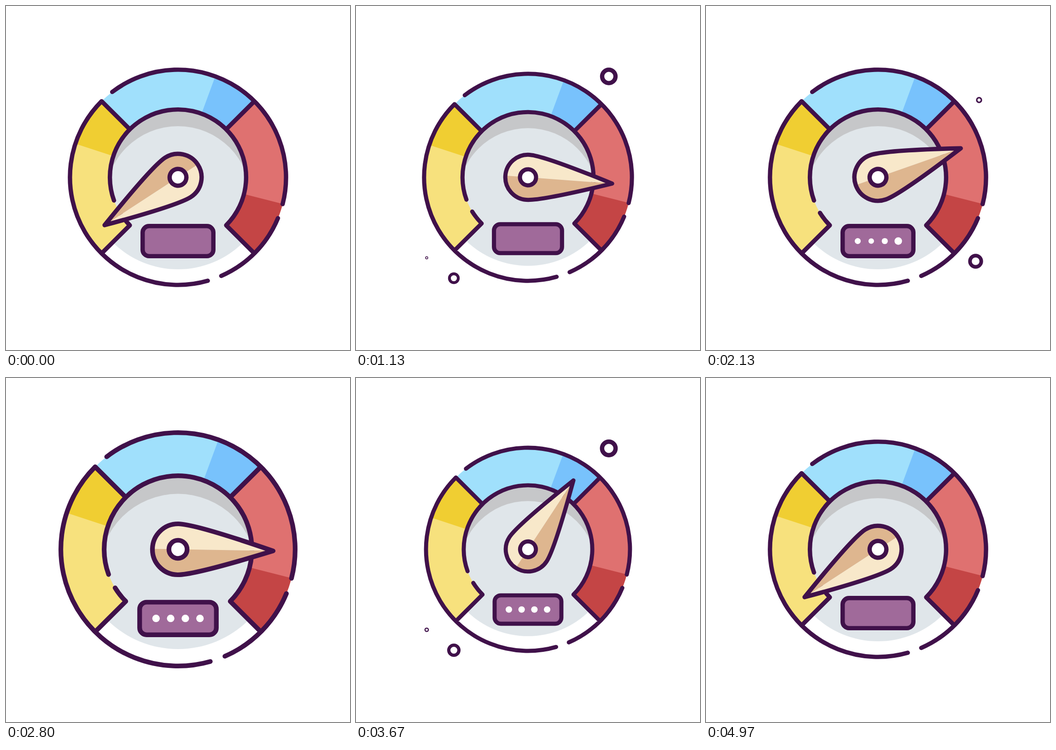
Animation, 747 px wide and 750 px high, one loop 5.01 s. Source, as an HTML page:

```html
<!DOCTYPE html>
<html lang="en">
<head>
<meta charset="utf-8">
<title>Gauge</title>
<style>
  html, body { margin: 0; width: 100%; height: 100%; overflow: hidden; background: #fff; }
  svg { display: block; width: 100%; height: 100%; }
  .line { fill: none; stroke: #40114a; stroke-width: 9.4; stroke-linecap: round; stroke-linejoin: round; }
  .band { fill: none; stroke-width: 86.7; }
  .white { fill: #fff; }
</style>
</head>
<body>
<svg viewBox="0 0 747 750">
  <g id="rings"></g>
  <g transform="translate(373.5 373.5)">
    <g id="gauge">
      <circle r="200.6" fill="#e0e6ea"/>
      <clipPath id="dial"><circle r="148"/></clipPath>
      <g clip-path="url(#dial)">
        <circle r="148" fill="#c6c7c9"/>
        <circle cy="46.5" r="158" fill="#e0e6ea"/>
      </g>
      <g id="bands"></g>
      <path id="outline" class="line"/>
      <rect class="line" x="-76.8" y="106.3" width="153.6" height="65.6" rx="14" style="fill:#a06a9a"/>
      <g id="dots" class="white"></g>
      <g id="needle">
        <path fill="#f8e8ca" d="M190.5 0C80-36 22-51.2 0-51.2A51.2 51.2 0 0 0-51.2 0Z"/>
        <path fill="#deb68f" d="M190.5 0C80 36 22 51.2 0 51.2A51.2 51.2 0 0 1-51.2 0Z"/>
        <path class="line" d="M190.5 0C80-36 22-51.2 0-51.2A51.2 51.2 0 0 0 0 51.2C22 51.2 80 36 190.5 0Z"/>
        <circle class="line" r="18.2" style="fill:#fff"/>
      </g>
    </g>
  </g>
</svg>
<script>
const LOOP = 5010, FRAME = 1000 / 30, HALF = 75;
const OUTER = 234.6, INNER = 147.9, MIDDLE = (OUTER + INNER) / 2;
const $ = id => document.getElementById(id);

function add(parent, tag, attrs) {
  const el = document.createElementNS("http://www.w3.org/2000/svg", tag);
  for (const key in attrs) el.setAttribute(key, attrs[key]);
  return parent.appendChild(el);
}

// Angles in degrees, clockwise from the right.
function polar(r, deg) {
  const a = deg * Math.PI / 180;
  return `${(r * Math.cos(a)).toFixed(2)} ${(r * Math.sin(a)).toFixed(2)}`;
}

function arc(r, from, to) {
  return `M${polar(r, from)}A${r} ${r} 0 ${to - from > 180 ? 1 : 0} 1 ${polar(r, to)}`;
}

[
  [135, 225, "#f7e17d"], [198.2, 225, "#f0ce32"],
  [225, 315, "#a0e0fc"], [290.2, 315, "#78c2fc"],
  [315, 405, "#df7170"], [374.3, 405, "#c44545"]
].forEach(([from, to, stroke]) =>
  add($("bands"), "path", { class: "band", d: arc(MIDDLE, from, to), stroke }));

$("outline").setAttribute("d", [
  arc(OUTER, 232.5, 374.4), arc(OUTER, 22.3, 66.4), arc(OUTER, 74, 225),
  arc(INNER, 160, 405), arc(INNER, 135, 148.4),
  ...[45, 135, 225, 315].map(a => `M${polar(INNER, a)}L${polar(OUTER, a)}`)
].join(""));

// Ring centres and the frame in each half loop when they appear.
const rings = [
  [549, 153.5, 20], [212.5, 593.5, 25], [153.5, 549, 30],
  [175.5, 175.5, 35], [593, 205, 40], [585.5, 556.5, 45]
].map(([x, y, start]) => ({
  x, y, start, el: add($("rings"), "circle", { class: "line", r: 14.7 })
}));

const dots = [-44, -14.7, 14.7, 44].map(x =>
  add($("dots"), "circle", { cx: x, cy: 139 }));

// Sine-eased value between [frame, value] keys.
function track(keys, f) {
  if (f <= keys[0][0]) return keys[0][1];
  for (let i = 1; i < keys.length; i++) {
    const [a, from] = keys[i - 1], [b, to] = keys[i];
    if (f < b) return from + (to - from) * (1 - Math.cos(Math.PI * (f - a) / (b - a))) / 2;
  }
  return keys[keys.length - 1][1];
}

const PULSE = [[0, 1], [20, 1.2], [40, 0.9], [60, 1]];
const SWING = [[0, 0], [40, 230], [70, 190], [94.7, 230], [134.7, 0]];
const POP = [[0, 0], [15, 1], [30, 0]];
const DOT_IN = [[0, 0], [10, 1.2], [20, 0.8], [30, 1]];
const DOT_OUT = [[0, 1], [10, 1.2], [18, 0]];

function draw(f) {
  const h = f % HALF;
  $("gauge").setAttribute("transform", `scale(${track(PULSE, h)})`);
  $("needle").setAttribute("transform", `rotate(${track(SWING, f) - 213.2})`);
  for (const { x, y, start, el } of rings) {
    const size = track(POP, h - start);
    el.setAttribute("transform", `translate(${x} ${y}) scale(${size})`);
    el.setAttribute("visibility", size > 0.02 ? "visible" : "hidden");
  }
  dots.forEach((dot, i) => {
    const size = track(DOT_IN, f - 40 - 3.5 * i) * track(DOT_OUT, f - 116 - 3 * i);
    dot.setAttribute("r", 7.5 * size);
  });
}

const begin = performance.now();
function tick() {
  const t = (performance.now() - begin) % LOOP;
  draw(Math.min(149, Math.floor((t + 4) / FRAME)));
  requestAnimationFrame(tick);
}
tick();
</script>
</body>
</html>
```
